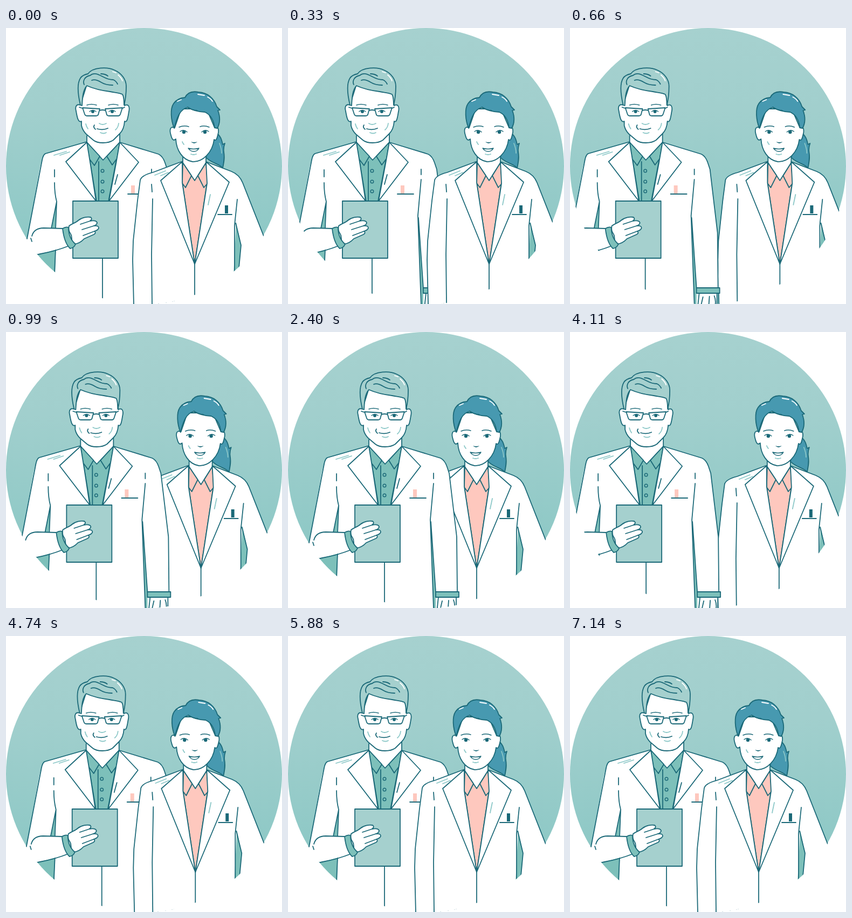
Write an HTML page that moves like this. It is 512 px wide and 512 px high and loops after 7.2 s.

```html
<!DOCTYPE html>
<html lang="en">
<head>
<meta charset="utf-8">
<title>Two doctors</title>
<style>
html, body { margin: 0; height: 100%; overflow: hidden; background: #fff; }
svg { display: block; width: 100%; height: 100%; }
.line { fill: none; stroke: #1b6978; stroke-width: 1.8; stroke-linejoin: round; stroke-linecap: round; }
.white { fill: #fff; }
.pale { fill: #a5d0ce; }
.teal { fill: #7dc0ba; }
.pink { fill: #fec8be; }
.blue { fill: #4799b0; }
.dark { fill: #1b6978; stroke: none; }
.soft { stroke: #8cc8c8; }
.shine { stroke: #fff; }
.thin { stroke-width: 1.4; }
.none { stroke: none; }
</style>
</head>
<body>
<svg viewBox="0 0 512 512">
  <defs>
    <linearGradient id="sky" x2="0" y2="1">
      <stop offset="0" stop-color="#a6d1cf"/>
      <stop offset=".3" stop-color="#a1cfcd"/>
      <stop offset="1" stop-color="#84c5c2"/>
    </linearGradient>
    <clipPath id="disc"><circle cx="256" cy="256" r="257"/></clipPath>
  </defs>
  <circle cx="256" cy="256" r="256" fill="url(#sky)"/>
  <g id="stage" clip-path="url(#disc)">

    <g id="man" class="line">
      <!-- coat and arms -->
      <path class="white none" d="M150 212L73 234Q67 238 62 264L39 391L0 400V520H270L316 482L313 380L299 262Q295 241 284 234L211 212Z"/>
      <path d="M150 211L73 233Q69 235 67 245L39 391M211 212L283 234Q291 238 295 250L299 262L313 380L314 482"/>
      <path class="teal none" d="M94 326L84 373H91ZM40 421L92 411L90 520H40Z"/>
      <path class="teal none" d="M265 352L270 512H274V482Z"/>
      <path d="M90 263V276M90 287Q90 307 94 322L92 372M94 322L84 372M92 411L90 455"/>
      <path d="M270 262V272M270 281L264 348L270 512M265 352L274 482"/>
      <path class="white" d="M279 492L276 520H312V492"/>
      <path d="M286 499L283 512M298 498L297 512M307 497Q310 504 309 512"/>
      <path class="teal" d="M274 482H317V492H274Z"/>
      <!-- shirt -->
      <path class="teal" d="M150 212L168 322H190L211 212Z"/>
      <path class="white none" d="M150 200V212L180 245L211 212V195Z"/>
      <path d="M150 200V212L180 245L211 212V195M172 248V320"/>
      <path class="teal" d="M150 212L154 242L164 255L174 238ZM211 212L206 242L197 254L187 238Z"/>
      <g class="thin"><circle cx="179" cy="265" r="2.8"/><circle cx="179" cy="285" r="2.8"/><circle cx="179" cy="303" r="2.8"/></g>
      <path class="white" d="M150 212L111 248L167 321L157 255ZM211 212L246 249L191 321L204 252Z"/>
      <path d="M207 272L202 290M179 427V512M226 308H256"/>
      <path class="pink none" d="M232 292H239V307H232Z"/>
      <path class="soft" d="M89 236L112 229M100 236L118 230"/>
      <!-- head -->
      <path class="white" d="M138 143C130 140 128 147 130 154C132 166 134 176 140 173V181Q142 190 149 197L162 208Q168 213 180 213Q192 213 199 208L211 196Q219 188 220 173C225 176 226 166 228 155C230 146 227 140 220 144L217 112L150 105Z"/>
      <path class="pale" d="M138 143C134 126 131 104 138 93Q142 87 152 85C161 72 189 72 201 78C215 84 223 96 223 108Q223 128 219 143Q219 128 216 123C209 120 202 120 193 118Q168 115 150 107C142 116 142 130 141 144Z"/>
      <path d="M145 105C142 98 146 90 156 88C164 81 173 87 181 91Q190 96 199 96Q204 98 207 104M159 97Q166 94 177 101Q185 106 198 106M176 85Q184 85 189 89"/>
      <path class="shine" d="M198 81L204 83M208 87Q214 92 216 98"/>
      <path class="thin" d="M150 143Q158 140 168 143M190 143Q199 140 208 143"/>
      <path d="M136 147L142 149M216 149L220 147M174 153Q179 151 184 153M142 148L174 150L171 161Q170 163 167 163H151Q147 163 146 160ZM216 148L184 150L187 161Q188 163 191 163H208Q211 163 212 160Z"/>
      <path class="thin" d="M155 155Q161 150 167 155M191 155Q197 150 203 155"/>
      <g class="dark"><circle cx="161" cy="155" r="3"/><circle cx="197" cy="155" r="3"/></g>
      <path class="soft" d="M173 177Q179 181 186 177M175 194Q181 197 186 194M209 177Q208 185 203 189M148 178Q149 183 152 187"/>
      <path d="M169 187Q180 190 189 186M164 180Q161 184 166 188"/>
      <!-- clipboard and hand -->
      <path class="pale" d="M124 321H208V427H124Z"/>
      <path class="white none" d="M47 389Q50 372 70 372H106L118 404L60 420L30 428Z"/>
      <path d="M48 386Q52 371 70 371L106 372M30 427L64 419Q92 414 117 404M46 390L48 396"/>
      <path class="white" d="M117 367C124 362 130 361 134 357C141 351 151 350 157 351Q161 354 156 358Q167 356 169 361Q169 365 163 367Q172 366 172 371Q171 375 164 377Q168 380 163 383L145 391Q137 400 126 401C119 393 124 388 120 382Q115 376 117 367Z"/>
      <path d="M156 358L138 364M163 367L141 374M164 377L143 385"/>
      <path class="teal" d="M105 372Q111 368 116 370Q116 390 129 401Q126 408 119 409Q108 399 105 372Z"/>
    </g>

    <g id="woman" class="line">
      <path class="blue" d="M388 192C399 201 400 207 402 216L406 214Q403 222 404 230C406 241 404 250 402 260C396 251 382 252 371 240Z"/>
      <path class="soft" d="M396 214Q400 224 400 232"/>
      <!-- coat -->
      <path class="white none" d="M328 246L272 268Q252 273 249 282L236 398L235 430L237 520H424L423 450L500 440L440 291Q434 272 420 267L371 248Z"/>
      <path d="M328 247L272 268Q252 273 249 282L244 320L236 395L235 430L237 514M371 248L418 266Q433 272 439 287L482 396"/>
      <path class="teal none" d="M427 360L436 403L430 460H422Z"/>
      <path d="M270 290L271 304M272 317L270 420L271 514M429 318L424 366V460M426 362L436 403L431 456"/>
      <!-- blouse -->
      <path class="pink" d="M327 250V287L350 438L373 287V250Z"/>
      <path class="white none" d="M328 235V250L350 283L371 250V235Z"/>
      <path d="M328 238V250L350 283L371 250V238"/>
      <path class="pink" d="M328 250L327 288L333 296L344 274ZM371 250L374 288L367 296L356 274Z"/>
      <path class="white" d="M327 248L287 283L350 438L327 287ZM371 248L414 286L350 438L373 288Z"/>
      <path d="M350 438V512M393 346H419"/>
      <path class="dark" d="M406 329H412V344H406Z"/>
      <path class="soft" d="M379 309L375 328M276 273L296 265M287 274L301 268"/>
      <!-- head -->
      <path class="white" d="M313 185C304 181 303 190 306 199C308 207 311 210 315 206C316 226 327 245 346 248C365 249 383 231 386 207C391 211 392 201 394 194C395 184 391 182 387 185L372 150H325Z"/>
      <path class="blue" d="M312 186C306 171 304 150 311 140Q318 130 332 129C337 119 347 117 357 119C374 120 386 130 391 146L397 152L393 153Q400 171 392 186L387 185C385 169 378 160 369 156Q349 155 337 147C323 151 317 165 312 186Z"/>
      <path d="M337 147Q346 153 354 153"/>
      <path class="shine" d="M356 123L368 125M374 128Q380 131 383 136M318 136L325 133"/>
      <path class="thin" d="M321 184Q330 180 339 183M360 183Q368 180 377 184"/>
      <path class="thin" d="M323 192Q330 187 336 193M363 193Q369 187 376 192"/>
      <g class="dark"><circle cx="330" cy="193" r="3.2"/><circle cx="369" cy="193" r="3.2"/></g>
      <path class="dark" d="M343 211Q349 213 355 211Q349 217 343 211Z"/>
      <path class="thin" d="M338 223Q348 226 358 223C354 231 343 231 338 223Z"/>
      <path class="soft" d="M343 234Q348 236 353 234M327 211Q328 214 330 216"/>
    </g>
  </g>
</svg>
<script>
const [stage, man, woman] = ["stage", "man", "woman"].map(id => document.getElementById(id));
const HALF = 3600, SWING = 1210, REACH = 40.2;
let front = woman;

function draw(now) {
  const t = now % (2 * HALF), u = t % HALF;
  // They step apart and back, changing places in depth at the widest point.
  const x = u < SWING ? REACH / 2 * (1 - Math.cos(2 * Math.PI * u / SWING)) : 0;
  man.setAttribute("transform", `translate(${-x})`);
  woman.setAttribute("transform", `translate(${x})`);
  const next = t >= SWING / 2 && t < HALF + SWING / 2 ? man : woman;
  if (next !== front) stage.append(front = next);
}

const start = performance.now();
function tick() {
  draw(performance.now() - start);
  requestAnimationFrame(tick);
}
tick();
</script>
</body>
</html>
```
